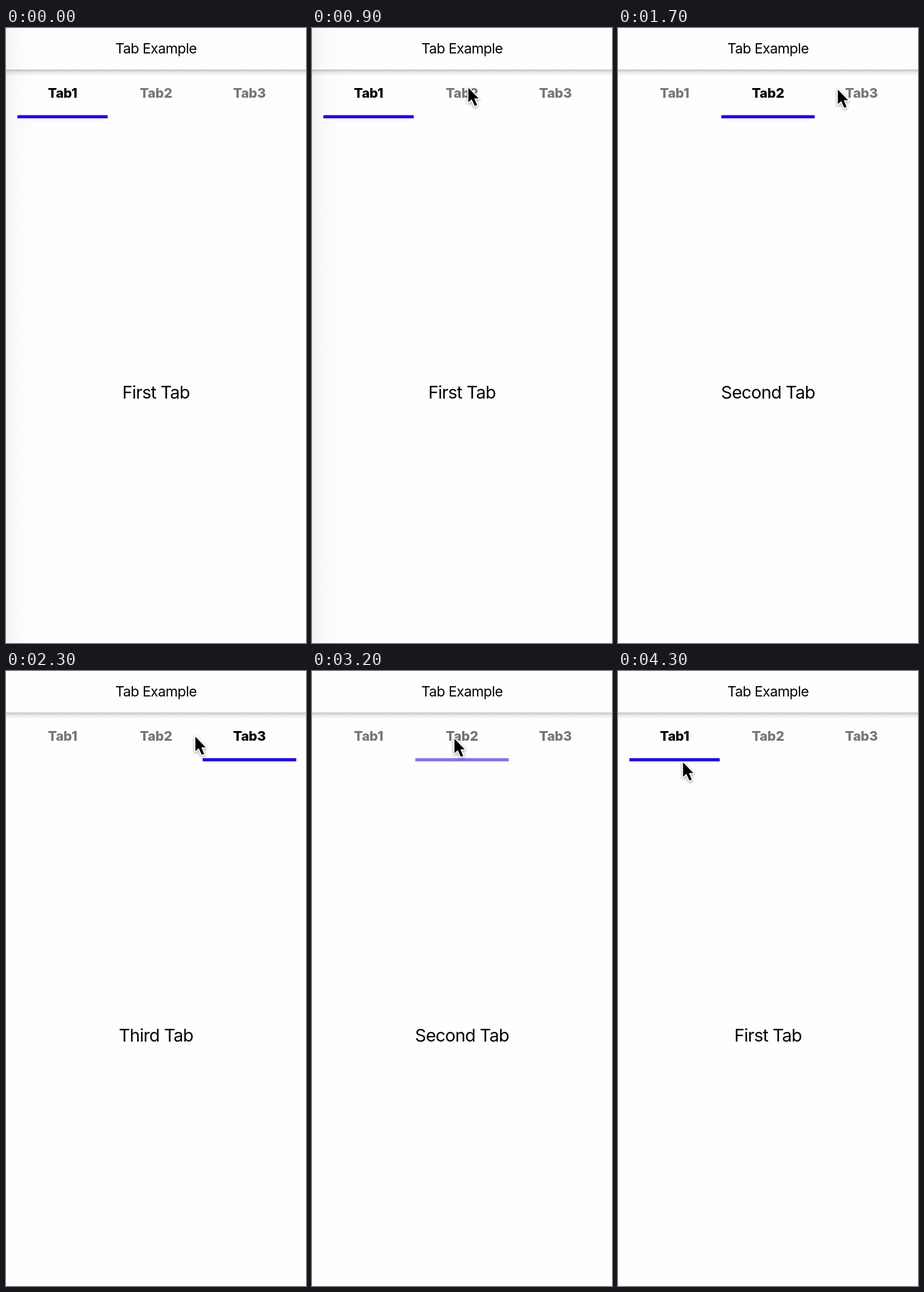
An HTML page with a canvas for the animation above (4.8 s loop, 496 px wide and 1014 px high).

```html
<!DOCTYPE html>
<html lang="en">
<head>
<meta charset="utf-8">
<title>Tab Example</title>
<style>
  html, body { margin: 0; width: 100%; height: 100%; overflow: hidden; background: #fefefe; }
  canvas { display: block; width: 496px; height: 1014px; }
</style>
</head>
<body>
<canvas id="stage"></canvas>
<script>
const W = 496, H = 1014, MID = W / 2, LOOP = 4800, TICK = 100;
const TAB_STEP = 154.5, TAB_PADDING = 101;
const TABS = ['First', 'Second', 'Third'];
const CLICKS = [
  { time: 1000, tab: 1 },
  { time: 1800, tab: 2 },
  { time: 3000, tab: 1 },
  { time: 3600, tab: 0 }
];
const ENTRY = { time: 200, x: 350, y: 587 };
const MOVES = [
  { from: 200, to: 700, x: 258, y: 97 },
  { from: 1250, to: 1700, x: 363, y: 100 },
  { from: 2000, to: 2700, x: 235, y: 110 },
  { from: 3200, to: 3500, x: 98, y: 113 },
  { from: 4050, to: 4300, x: 107, y: 149 }
];
const ARROW = new Path2D('M.5 1.6V25.6L6 20.6 11 31.6 15 29.9 10.3 19.3H17.5Z');

const canvas = document.getElementById('stage');
const ctx = canvas.getContext('2d');
const ratio = window.devicePixelRatio || 1;
canvas.width = W * ratio;
canvas.height = H * ratio;

const progress = (t, from, to) => Math.min(Math.max((t - from) / (to - from), 0), 1);
const smooth = k => k * k * (3 - 2 * k);
const easeOut = k => 1 - (1 - k) ** 2;
const easeInOut = k => k < 0.5 ? 2 * k * k : 1 - 2 * (1 - k) ** 2;

function pointerAt(t) {
  let { x, y } = ENTRY;
  for (const move of MOVES) {
    const k = progress(t, move.from, move.to);
    x += (move.x - x) * smooth(k);
    y += (move.y - y) * easeOut(k);
  }
  return { x, y };
}

// A pressed tab dims to 20% and eases back after release.
const pressOpacity = age => 0.2 + 0.8 * easeInOut(progress(age, 82, 332));

function text(str, x, y, size, weight, color, tracking) {
  ctx.font = `${weight} ${size}px Inter, "Open Sans", sans-serif`;
  ctx.letterSpacing = `${size * tracking}px`;
  ctx.textAlign = 'center';
  ctx.fillStyle = color;
  ctx.fillText(str, x, y);
  return ctx.measureText(str).width;
}

function fade(x0, y0, x1, y1, alpha, w, h) {
  const g = ctx.createLinearGradient(x0, y0, x1, y1);
  g.addColorStop(0, `rgba(0,0,0,${alpha})`);
  g.addColorStop(0.4, `rgba(0,0,0,${alpha * 0.36})`);
  g.addColorStop(1, 'rgba(0,0,0,0)');
  ctx.fillStyle = g;
  ctx.fillRect(x0, y0, w, h);
}

function drawTab(i, active, opacity) {
  const x = MID + (i - 1) * TAB_STEP;
  ctx.globalAlpha = active ? opacity : 1;
  const color = active ? '#000' : '#767676';
  const width = text(`Tab${i + 1}`, x, 114.5, 22, 800, color, -0.01) + TAB_PADDING;
  if (active) {
    ctx.fillStyle = '#1a00ff';
    ctx.fillRect(x - width / 2, 143.7, width, 5.2);
  }
  ctx.globalAlpha = 1;
}

function drawPointer({ x, y }) {
  ctx.save();
  ctx.translate(x, y);
  ctx.lineJoin = 'round';
  ctx.lineWidth = 3.6;
  ctx.strokeStyle = '#fff';
  ctx.shadowColor = 'rgba(0,0,0,0.4)';
  ctx.shadowBlur = 4 * ratio;
  ctx.shadowOffsetY = 1.5 * ratio;
  ctx.stroke(ARROW);
  ctx.shadowColor = 'transparent';
  ctx.fillStyle = '#000';
  ctx.fill(ARROW);
  ctx.restore();
}

function drawRing({ x, y }) {
  ctx.beginPath();
  ctx.arc(x, y + 3, 42.7, 0, Math.PI * 2);
  ctx.lineWidth = 3;
  ctx.strokeStyle = '#000';
  ctx.stroke();
}

function draw(t) {
  ctx.setTransform(ratio, 0, 0, ratio, 0, 0);
  ctx.fillStyle = '#fefefe';
  ctx.fillRect(0, 0, W, H);

  const click = CLICKS.filter(c => t >= c.time + TICK).pop();
  const active = click ? click.tab : 0;
  const opacity = click ? pressOpacity(t - click.time) : 1;

  fade(0, 68.5, 0, 79, 0.25, W, 10.5);
  text('Tab Example', MID, 42, 23.3, 400, '#000', -0.025);
  TABS.forEach((_, i) => drawTab(i, i === active, opacity));
  text(`${TABS[active]} Tab`, MID, 611, 29, 400, '#000', -0.027);
  if (!click) fade(0, 0, 48, 0, 0.045, 48, H);

  if (t < ENTRY.time) return;
  const pointer = pointerAt(t);
  if (CLICKS.some(c => t >= c.time && t < c.time + TICK)) drawRing(pointer);
  drawPointer(pointer);
}

const start = performance.now();
function loop() {
  const t = (performance.now() - start) % LOOP;
  draw(Math.floor(t / TICK) * TICK);
  requestAnimationFrame(loop);
}
loop();
</script>
</body>
</html>
```
